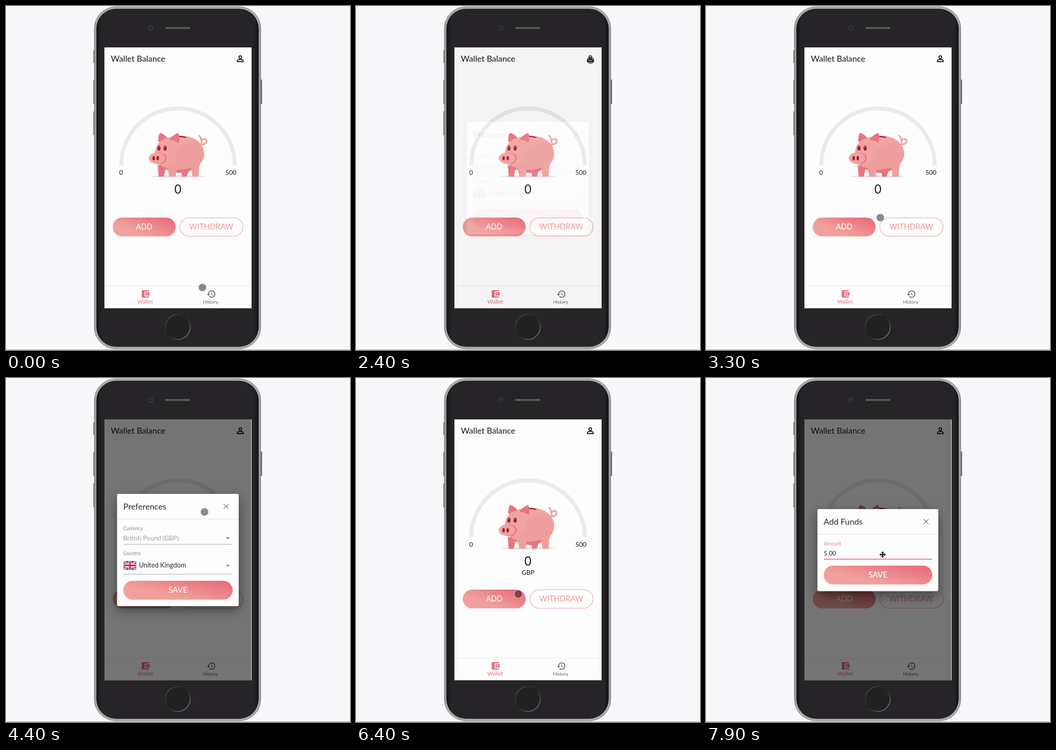
Animation of 748x748 px, one loop 8000 ms. Source, as an HTML page:

```html
<!DOCTYPE html>
<html lang="en">
<head>
<meta charset="utf-8">
<title>Wallet</title>
<style>
html, body { margin: 0; width: 100%; height: 100%; overflow: hidden; background: #f8f7f9; }
svg { display: block; width: 748px; height: 748px; font-family: Lato, "Open Sans", sans-serif; }
.card { filter: drop-shadow(0 9px 12px rgba(0,0,0,.42)); }
.menu { filter: drop-shadow(0 4px 5px rgba(0,0,0,.35)); }
.snack { filter: drop-shadow(0 2px 3px rgba(0,0,0,.35)); }
</style>
</head>
<body>
<svg id="stage" viewBox="0 0 748 748" xmlns="http://www.w3.org/2000/svg"></svg>
<script>
const LOOP = 8000, STEP = 100;
const INK = '#161517', ROSE = '#ea7380', SALMON = '#f0a19c', WINE = '#9c1c2c';

const rect = (x, y, w, h, fill, r = 0, more = '') =>
  `<rect x="${x}" y="${y}" width="${w}" height="${h}" rx="${r}" fill="${fill}" ${more}/>`;
const oval = (x, y, rx, ry, fill, more = '') =>
  `<ellipse cx="${x}" cy="${y}" rx="${rx}" ry="${ry}" fill="${fill}" ${more}/>`;
const path = (d, fill, more = '') => `<path d="${d}" fill="${fill}" ${more}/>`;
const line = (d, color, w, more = '') =>
  path(d, 'none', `stroke="${color}" stroke-width="${w}" ${more}`);
const text = (x, y, size, fill, str, anchor = 'start', more = '') =>
  `<text x="${x}" y="${y}" font-size="${size}" fill="${fill}" text-anchor="${anchor}" ${more}>${str}</text>`;
const group = (id, body, more = '') => `<g id="${id}" ${more}>${body}</g>`;
const cross = (x, y, r, color, w) =>
  line(`M${x - r} ${y - r}l${2 * r} ${2 * r}m0 ${-2 * r}l${-2 * r} ${2 * r}`, color, w);
const pill = (x, y, w, label, size) =>
  rect(x, y, w, 41, 'url(#blush)', 20.5) + text(x + w / 2, y + 26.3, size, '#fff', label, 'middle');

const defs = `<defs>
  <linearGradient id="blush" x1=".15" y1=".9" x2="1" y2=".2">
    <stop offset=".25" stop-color="${SALMON}"/><stop offset="1" stop-color="#e86e7d"/>
  </linearGradient>
  <linearGradient id="rim" x2="1"><stop stop-color="#8d8c8e"/><stop offset=".012" stop-color="#aaa9ab"/>
    <stop offset=".988" stop-color="#aaa9ab"/><stop offset="1" stop-color="#8d8c8e"/></linearGradient>
  <linearGradient id="bezel" x2="1"><stop stop-color="#131214"/><stop offset=".03" stop-color="#262427"/>
    <stop offset=".97" stop-color="#262427"/><stop offset="1" stop-color="#131214"/></linearGradient>
  <linearGradient id="ring" x1=".1" y1=".1" x2=".9" y2=".9"><stop stop-color="#4a494b"/>
    <stop offset=".45" stop-color="#1d1c1e"/><stop offset="1" stop-color="#737275"/></linearGradient>
  <linearGradient id="hide" x1=".1" y1="0" x2=".5" y2=".6"><stop stop-color="#ee7c86"/>
    <stop offset=".25" stop-color="#f4b0ac"/><stop offset=".8" stop-color="#ee9f9c"/></linearGradient>
  <clipPath id="screen"><rect x="214" y="90" width="320" height="567.5"/></clipPath>
  <clipPath id="flag"><rect width="28" height="19"/></clipPath>
</defs>`;

const phone = [
  rect(0, 0, 748, 748, '#f8f7f9'),
  rect(0, 747, 748, 1, '#a5a4a6'),
  ...[[190, 96, 28], [190, 161, 52], [190, 229, 52], [552, 160, 53]]
    .map(([x, y, h]) => rect(x, y, 5, h, '#717073', 1)),
  rect(192, 1.5, 362, 744, 'url(#rim)', 47, 'stroke="#858486" stroke-width="1"'),
  rect(196.5, 6, 353, 735, 'url(#bezel)', 43),
  oval(315, 48, 5.5, 5.5, '#39383b'), oval(315, 48, 3, 3, '#171619'), oval(315, 47.5, 1.2, 1.2, '#4a4a58'),
  rect(345, 44.5, 57, 6.5, '#4a494b', 3, 'stroke="#151416"'),
  line('M348 47.8H399', '#69686a', 3, 'stroke-dasharray="1 1"'),
  oval(373.5, 698, 27, 27, '#212022', 'stroke="url(#ring)" stroke-width="2"')
].join('');

const pig = [
  oval(374, 370.5, 59, 2.7, '#e4e3e4'),
  path('M330 346h22l-6 12-3 13h-11zM380 352h19l-6 19h-10z', ROSE),
  line('M416 296C424 306 437 300 436 292C434 286 424 289 425 297C427 304 438 300 436 292M425 297C425 290 424 286 420 282',
    '#ee9f9c', 3.2, 'stroke-linecap="round"'),
  path('M324 320C324 296 348 282 380 282C411 282 431 300 431 322C431 343 411 355 377 356C348 357 324 348 324 320Z', 'url(#hide)'),
  path('M344 350C365 358 390 357 408 350C403 361 389 364 376 363C361 362 349 359 344 350Z', ROSE),
  path('M354 340h22l-4 12-3 19h-14l-4-19zM403 335h22l-5 16-1 20h-14z', '#ee9f9c'),
  path('M363 284.5Q378 279.5 393 285.5L391 287Q377 283.5 365 286.5Z', WINE),
  path('M331 294Q331 280 335 276Q345 278 351 288Q340 289 334 297Z', ROSE),
  path('M326 326C324 302 336 287 353 288C369 290 374 305 370 322C365 340 350 347 336 345Z', '#f0a3a0'),
  path('M355 291Q365 278 375 276Q379 285 375 298Q367 291 355 291Z', ROSE),
  path('M323 319C343 317 351 324 349 334C347 342 338 345 328 344Z', ROSE),
  oval(328.5, 331, 18, 12.3, '#f1a29e'),
  ...[[321, 331, 2.6, 4.8], [330, 331, 2.6, 4.8], [332.5, 309, 3.5, 5.5], [346, 309, 3.5, 5.5]]
    .map(([x, y, rx, ry]) => oval(x, y, rx, ry, WINE)),
  oval(331.6, 306.8, 1, 1.5, '#d98a90'), oval(345.1, 306.8, 1, 1.5, '#d98a90')
].join('');

const walletIcon = 'M21 18v1c0 1.1-.9 2-2 2H5c-1.1 0-2-.9-2-2V5c0-1.1.9-2 2-2h14c1.1 0 2 .9 2 2v1h-9c-1.1 0-2 .9-2 2v8c0 1.1.9 2 2 2zM12 16h10V8H12zM16 13.5a1.5 1.5 0 1 1 0-3a1.5 1.5 0 0 1 0 3z';
const historyIcon = 'M13 3a9 9 0 0 0-9 9H1l4 4 4-4H6a7 7 0 1 1 2.06 4.94l-1.42 1.42A9 9 0 1 0 13 3zM12 8v5l4.28 2.54.72-1.21-3.5-2.08V8z';

const home = [
  rect(214, 90, 320, 567.5, '#fefdfe'),
  text(228, 120.5, 18.2, INK, 'Wallet Balance'),
  oval(509.5, 111.2, 2.9, 2.9, 'none', 'stroke="#111" stroke-width="1.9"'),
  line('M503.2 121v-1.7c0-4 12.6-4 12.6 0V121z', '#111', 1.9),
  line('M250.5 346a123.5 123.5 0 0 1 247 0', '#ecebec', 8.6),
  pig,
  text(250.3, 367.3, 13.8, INK, '0', 'middle'),
  text(489, 367.3, 13.8, INK, '500', 'middle'),
  text(373.8, 408, 26, INK, '0', 'middle'),
  text(374, 427.8, 14, INK, 'GBP', 'middle', 'id="unit"'),
  pill(232, 460, 137, 'ADD', 16.3),
  rect(378, 460.5, 137.5, 40, '#fefdfe', 20, 'stroke="#eb9a98" stroke-width="1.1"'),
  text(446.3, 486.3, 16.7, '#e99a98', 'WITHDRAW', 'middle'),
  rect(214, 608, 320, 2.4, '#f4f3f4'),
  path(walletIcon, '#e66f7d', 'fill-rule="evenodd" transform="translate(292.4 615.2) scale(.9)"'),
  path(historyIcon, '#5d5c5f', 'transform="translate(436 616) scale(.87)"'),
  text(302.5, 647, 12, '#e66f7d', 'Wallet', 'middle'),
  text(445, 646.8, 10.2, '#5d5c5f', 'History', 'middle')
].join('');

const snack = group('snack', [
  rect(240, 610.5, 268, 40.5, ROSE, 4, 'class="snack"'),
  oval(263, 630.5, 7.4, 7.4, 'none', 'stroke="#fff" stroke-width="1.5"'),
  line('M263 629.5v4.8M263 626.4v1.7', '#fff', 1.6),
  text(283, 635, 12.6, '#fff', 'You need to set your preferences'),
  cross(490, 630.5, 4.6, '#fff', 1.6)
].join(''));

const flag = (x, y, body) => `<g transform="translate(${x} ${y})" clip-path="url(#flag)">${body}</g>`;
const diagonals = 'M0 0L28 19M28 0L0 19', upright = 'M14 0V19M0 9.5H28';
const ukFlag = rect(0, 0, 28, 19, '#27408f') + line(diagonals, '#fff', 4) + line(diagonals, '#d6263f', 1.4) +
  line(upright, '#fff', 6.4) + line(upright, '#d6263f', 3.6);
const usFlag = rect(0, 0, 28, 19, '#fff') +
  Array.from({ length: 7 }, (_, i) => rect(0, i * 2.92, 28, 1.46, '#d33a4a')).join('') +
  rect(0, 0, 13, 10.2, '#34508f') +
  Array.from({ length: 12 }, (_, i) => oval(2 + i % 4 * 3, 2 + Math.floor(i / 4) * 3, .6, .6, '#fff')).join('');

const card = (x, y, w, h, title) => rect(x, y, w, h, '#fefdfe', 3, 'class="card"') +
  text(x + 13.5, y + 33.7, 18.1, '#29282b', title) + cross(478.5, y + 27.3, 5.2, '#858487', 1.6) +
  rect(x, y + 54.3, w, 1, '#dddcde');
const caret = y => path(`M477.5 ${y}h9.6l-4.8 4.6z`, '#969598');

const backdrop = rect(214, 90, 319, 567.5, '#000', 0, 'fill-opacity=".54"');

const menu = group('menu', [
  rect(255, 381, 237.5, 95, '#fefdfe', 3, 'class="menu"'),
  rect(255, 388, 237.5, 41, '#e6e4e7'),
  flag(268, 399, ukFlag), text(303, 413.2, 14.4, '#29282b', 'United Kingdom'),
  flag(268, 439.5, usFlag), text(303, 454, 14.3, '#29282b', 'United States')
].join(''));

const prefs = group('prefs', backdrop + card(241.5, 252, 264.5, 244, 'Preferences') + [
  text(255, 331, 10.6, '#858487', 'Currency'),
  text(255, 352.6, 13.9, '#9c9b9e', 'British Pound (GBP)'), caret(346.5),
  rect(255, 361, 238, 1, '#a5a4a7'),
  text(255, 385, 10.6, '#858487', 'Country', 'start', 'id="country"'),
  flag(255.5, 398, ukFlag), text(289, 412, 14.4, '#29282b', 'United Kingdom'), caret(406),
  rect(255, 426, 238, 1, '#a5a4a7'),
  pill(255, 441, 238, 'SAVE', 17.3),
  menu
].join(''));

const funds = group('funds', backdrop + card(242.3, 285, 262.7, 178.5, 'Add Funds') + [
  text(256, 363.6, 10.7, '#e8818b', 'Amount'),
  text(256, 385.6, 13.7, '#29282b', '', 'start', 'id="amount"'),
  rect(256, 393, 236, 1.8, '#e66f7d'),
  pill(256, 408, 236, 'SAVE', 17.3)
].join(''));

const pointer = group('pointer',
  group('dot', oval(0, 0, 8.6, 8.6, '#000', 'fill-opacity=".45" stroke="#fff" stroke-opacity=".6" stroke-width="1"')) +
  group('move', line('M-5 0H5M0 -5V5', '#000', 2) +
    [0, 90, 180, 270].map(a => path('M0 -7l3.2 3.6h-6.4z', '#000', `transform="rotate(${a})"`)).join('')));

document.getElementById('stage').innerHTML = defs + phone +
  `<g clip-path="url(#screen)">${home}${snack}${prefs}${funds}</g>` + pointer;
const el = id => document.getElementById(id);

// Pointer stops: time, x, y
const trail = [
  [0, 427, 612], [350, 325, 487], [550, 318, 483], [900, 398, 526], [1200, 489, 629], [1400, 490, 630],
  [1800, 500, 112], [2100, 510, 118], [2500, 510, 118], [2900, 381, 458], [3300, 379, 460], [3800, 509, 116],
  [4100, 509, 116], [4600, 380, 408], [4900, 376, 408], [5300, 368, 444], [5500, 362, 410], [5600, 362, 410],
  [5850, 376, 460], [6200, 374, 460], [6400, 353, 470], [6600, 318, 480], [6800, 316, 480], [7100, 384, 384],
  [8000, 384, 384]
];
const typed = [[7400, '5'], [7500, '5.'], [7600, '5.0'], [7700, '5.00']];

const clamp = v => Math.min(1, Math.max(0, v));
const ease = v => v * v * (3 - 2 * v);
const fade = (t, from, to, rise = 225, fall = 195) =>
  ease(clamp((t - from) / rise)) * (1 - ease(clamp((t - to) / fall)));

function place(t) {
  const i = Math.max(1, trail.findIndex(stop => stop[0] > t));
  const [t0, x0, y0] = trail[i - 1], [t1, x1, y1] = trail[i];
  const k = (t - t0) / (t1 - t0);
  return [x0 + (x1 - x0) * k, y0 + (y1 - y0) * k];
}

function show(id, opacity) {
  el(id).setAttribute('opacity', opacity);
  el(id).setAttribute('display', opacity > 0 ? 'inline' : 'none');
}

function render(t) {
  const pop = fade(t, 480, 1350), scale = .85 + .15 * pop;
  show('snack', pop);
  el('snack').setAttribute('transform', `translate(374 631) scale(${scale}) translate(-374 -631)`);
  show('prefs', Math.max(fade(t, 2366, 2970), fade(t, 3950, 5970)));
  show('menu', fade(t, 4780, 5550, 180, 180));
  el('country').setAttribute('fill', t >= 4700 && t < 5950 ? '#e66f7d' : '#858487');
  show('unit', t >= 6100 ? 1 : 0);
  show('funds', fade(t, 6680, LOOP));
  el('amount').textContent = typed.reduce((value, [at, str]) => t >= at ? str : value, '');

  const [x, y] = place(t), editing = t >= 7100;
  el('pointer').setAttribute('transform', `translate(${x} ${y})`);
  show('dot', editing ? 0 : 1);
  show('move', editing ? 1 : 0);
}

function tick() {
  render(Math.floor((performance.now() + 8) / STEP) * STEP % LOOP);
  requestAnimationFrame(tick);
}
tick();
</script>
</body>
</html>
```
